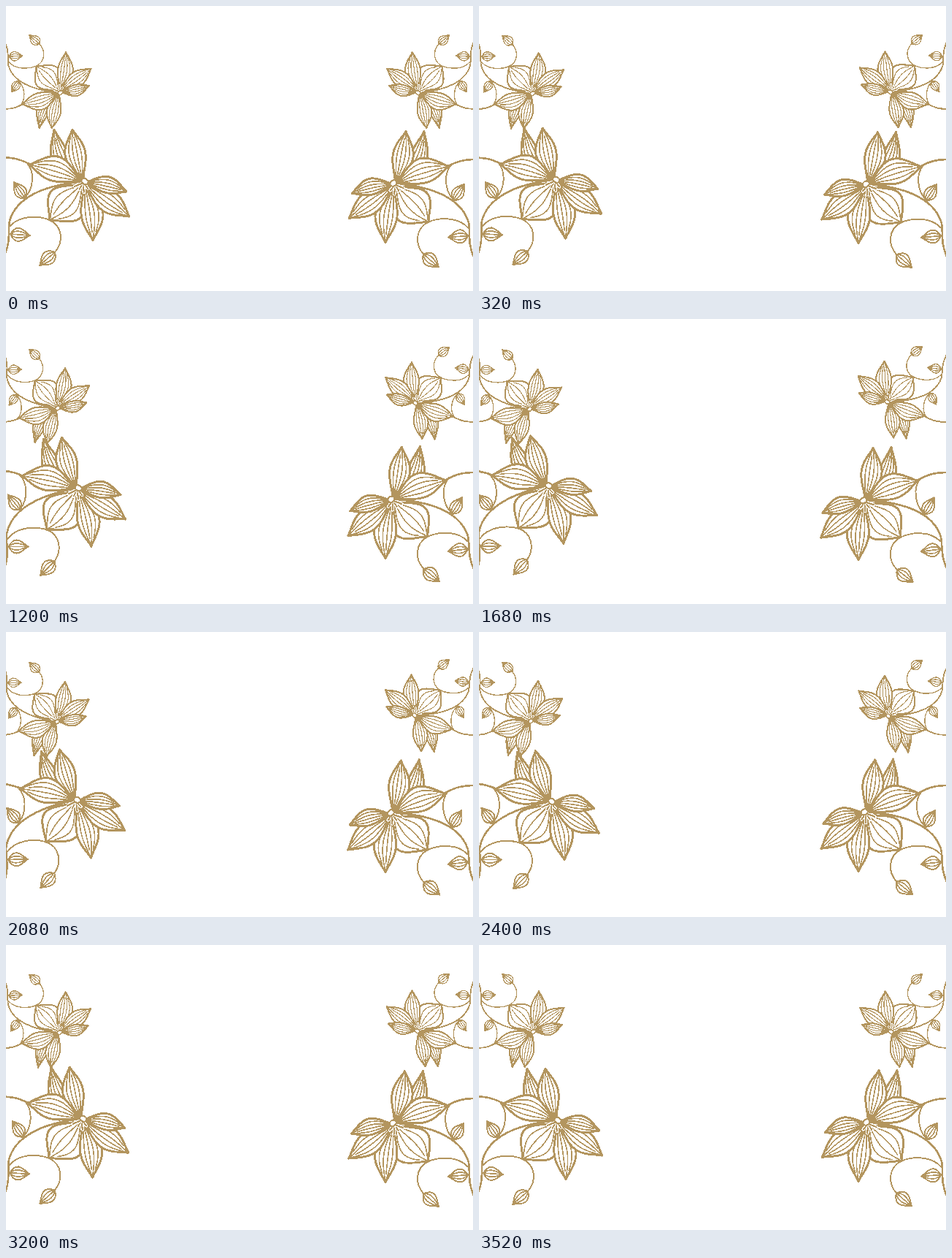
Write an HTML page with a canvas that moves like this. It is 640 by 390 pixels and loops after 3600 ms.

```html
<!DOCTYPE html>
<html lang="en">
<head>
<meta charset="utf-8">
<title>Swaying flowers</title>
<style>
  html, body { margin: 0; width: 100%; height: 100%; overflow: hidden; background: #fff; }
  canvas { display: block; }
</style>
</head>
<body>
<canvas id="stage" width="640" height="390"></canvas>
<script>
const W = 640, H = 390, GOLD = [179, 149, 94];
const LOOP = 3600, STEP = 80, HALF = 22;
const ctx = document.getElementById('stage').getContext('2d', { willReadFrequently: true });

const HEART = { x: 106, y: 242 };

// Each petal runs from the heart to its tip; bend shifts its middle sideways.
const petals = [
  { x: 66, y: 169, half: 12, bend: -11 },
  { x: 91, y: 169, half: 14, bend: -3 },
  { x: 32, y: 217, half: 17, bend: 6 },
  { x: 60, y: 293, half: 27, bend: -2 },
  { x: 119, y: 321, half: 15, bend: -5 },
  { x: 169, y: 288, half: 15, bend: 0 },
  { x: 165, y: 254, half: 11, bend: -4 }
];
const leaves = [
  { from: { x: 26, y: 263 }, x: 11, y: 241, half: 8 },
  { from: { x: 67, y: 337 }, x: 46, y: 355, half: 9 },
  { from: { x: 6, y: 312 }, x: 33, y: 314, half: 9 }
];
const stems = [
  'M98 241C52 246 14 262 5 294C2 306 8 322 -4 345',
  'M34 217C20 210 10 206 -14 208',
  'M28 214C40 226 38 250 26 262',
  'M6 301C18 287 42 286 60 293C78 302 79 323 67 337'
].map((d, i) => ({ path: new Path2D(d), width: i < 2 ? 2.5 : 1.8 }));

const corners = [
  { pivot: [0, 341], turn: -7, at: [0, 0], scale: [1, 1] },
  { pivot: [W, 325], turn: -3.15, at: [639, 2.5], scale: [-1, 1] },
  { pivot: [0, 42], turn: 4, at: [0, 283], scale: [0.69, -0.685] },
  { pivot: [W, 42], turn: 4, at: [639.5, 283], scale: [-0.695, -0.685] }
];

function erase(paint) {
  ctx.globalCompositeOperation = 'destination-out';
  paint();
  ctx.globalCompositeOperation = 'source-over';
}

function stroke(width, path) {
  ctx.lineWidth = width;
  path ? ctx.stroke(path) : ctx.stroke();
}

// A blade swells to its widest at `peak` and narrows to a drawn-out point.
function drawBlade({ from = HEART, x, y, half, bend = 0 }, { peak, veins, edge, vein }) {
  const dx = x - from.x, dy = y - from.y, length = Math.hypot(dx, dy);
  const power = Math.log(0.5) / Math.log(peak);

  // side runs from -1 (one edge) to 1 (the other)
  const lineAlong = (side, start, end) => {
    const steps = 24;
    for (let i = 0; i <= steps; i++) {
      const t = start + (end - start) * i / steps;
      const swell = Math.max(0, Math.sin(Math.PI * t ** power)) ** 1.15;
      const off = (side * half * swell + bend * Math.sin(Math.PI * t)) / length;
      ctx.lineTo(from.x + dx * t - dy * off, from.y + dy * t + dx * off);
    }
  };

  ctx.beginPath();
  lineAlong(-1, 0, 1);
  lineAlong(1, 1, 0);
  erase(() => ctx.fill());
  stroke(edge);
  for (let v = 1; v <= veins; v++) {
    ctx.beginPath();
    lineAlong(2 * v / (veins + 1) - 1, 0.08, 0.96 - 0.1 * (v % 2));
    stroke(vein);
  }
}

function drawHeart() {
  for (let i = 0; i < 4; i++) {
    const a = 0.9 + i * 0.62, reach = 10 + 3 * (i % 2);
    ctx.beginPath();
    ctx.moveTo(HEART.x, HEART.y);
    ctx.lineTo(HEART.x + reach * Math.cos(a), HEART.y + reach * Math.sin(a));
    erase(() => stroke(4.5));
    stroke(2);
  }
  ctx.beginPath();
  ctx.ellipse(HEART.x + 2, HEART.y - 2, 4.8, 3.8, 0.6, 0, 2 * Math.PI);
  erase(() => ctx.fill());
  stroke(2);
}

function drawFlower() {
  stems.forEach(s => stroke(s.width, s.path));
  petals.forEach(p => drawBlade(p, { peak: 0.55, veins: 4, edge: 2.8, vein: 1.5 }));
  leaves.forEach(l => drawBlade(l, { peak: 0.4, veins: 3, edge: 1.8, vein: 1.5 }));
  drawHeart();
}

// Hard, unsmoothed edges
function harden() {
  const image = ctx.getImageData(0, 0, W, H), d = image.data;
  for (let i = 0; i < d.length; i += 4) {
    d.set(GOLD, i);
    d[i + 3] = d[i + 3] > 110 ? 255 : 0;
  }
  ctx.putImageData(image, 0, 0);
}

function draw(sway) {
  ctx.clearRect(0, 0, W, H);
  ctx.lineJoin = ctx.lineCap = 'round';
  for (const { pivot: [px, py], turn, at, scale } of corners) {
    ctx.save();
    ctx.translate(px, py);
    ctx.rotate(turn * sway * Math.PI / 180);
    ctx.translate(at[0] - px, at[1] - py);
    ctx.scale(...scale);
    drawFlower();
    ctx.restore();
  }
  harden();
}

let shown = -1;
const start = performance.now();
function tick() {
  const step = Math.floor((performance.now() - start) % LOOP / STEP);
  if (step !== shown) {
    shown = step;
    draw(1 - Math.abs(step - HALF) / HALF);
  }
  requestAnimationFrame(tick);
}
tick();
</script>
</body>
</html>
```
